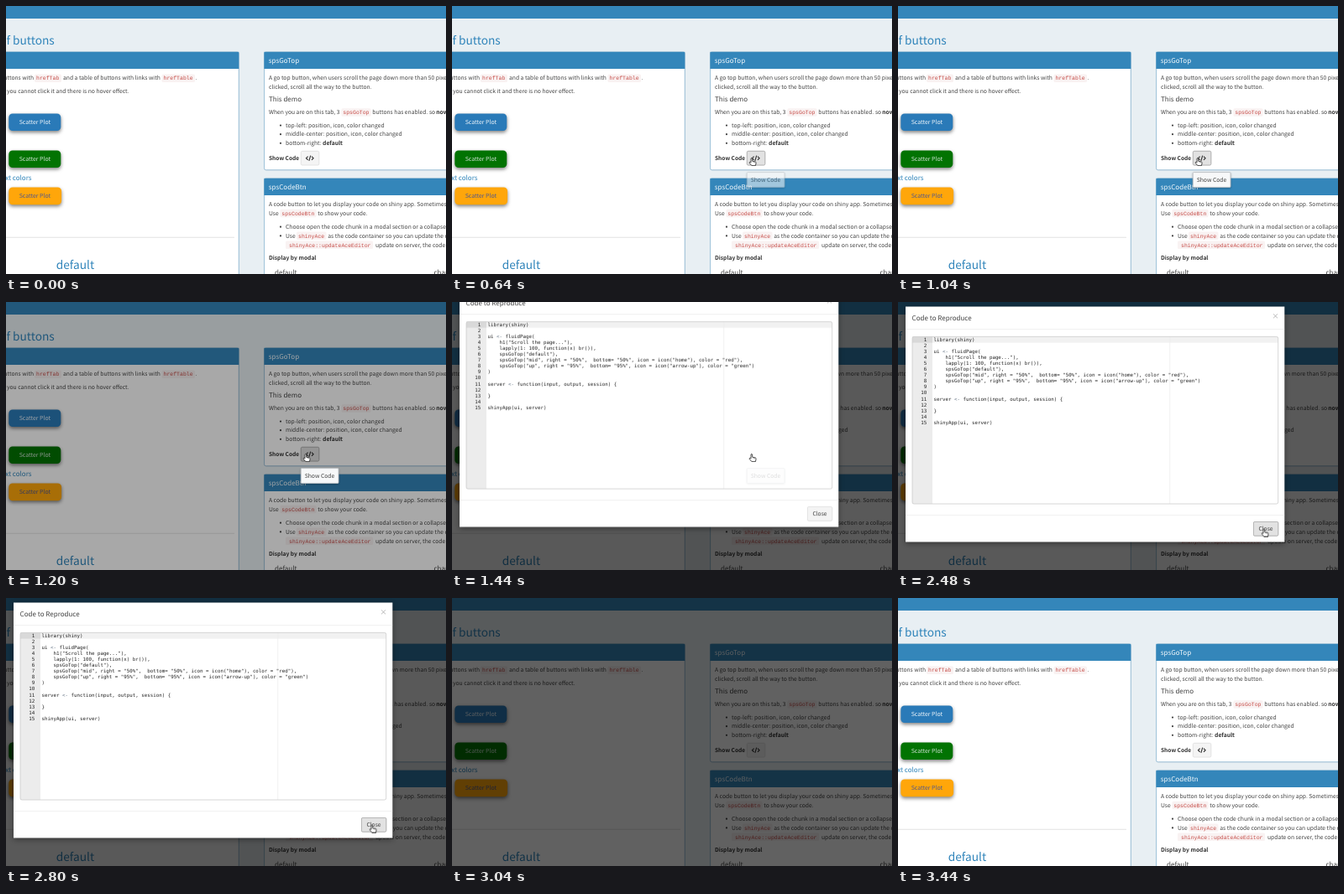
Recreate the animation shown at these times as an HTML page. Size 524 by 320 pixels, loop 3.52 s.

```html
<!DOCTYPE html>
<html lang="en">
<head>
<meta charset="utf-8">
<title>Show code button</title>
<style>
html, body { margin: 0; width: 524px; height: 320px; overflow: hidden; background: #e8eff3; }
svg { display: block; }
text {
  font-family: "Noto Sans CJK JP", "Noto Sans CJK SC", "Noto Sans CJK", "Noto Sans", sans-serif;
  font-size: 6.75px; fill: #444; white-space: pre; text-rendering: geometricPrecision;
}
.head { font-size: 8px; fill: #f4f9fc; }
.sub { font-size: 8px; }
.big { font-size: 13.7px; }
.label { font-size: 6.95px; text-anchor: middle; }
.blue { fill: #2f84ba; }
.bold { font-weight: 700; fill: #333; }
.end { text-anchor: end; }
.mid { text-anchor: middle; }
.code { font-family: "Liberation Mono", "DejaVu Sans Mono", monospace; font-size: 6.5px; fill: #c54a45; }
.chip { fill: #f9f2f2; }
.src, .src tspan { font-family: "DejaVu Sans Mono", "Noto Sans Mono", monospace; font-size: 5.8px; fill: #222; }
.src .op { fill: #687687; }
.bar { fill: #3486ba; }
.card { fill: #fff; stroke: #93bdd7; stroke-width: .9; filter: drop-shadow(0 .6px .6px rgba(0,0,0,.15)); }
.pill { filter: drop-shadow(0 2px 2.3px rgba(0,0,0,.5)); }
.btn { fill: #f4f4f4; stroke: #ddd; stroke-width: .8; }
.hot { fill: #e2e2e2; stroke: #a6a6a6; stroke-width: .8; }
.rule { stroke: #dcdcdc; stroke-width: .8; }

#dim, #modal, #tip, #hand, #hover1, #hover2 { animation: 3520ms linear infinite; }
#dim { animation-name: dim; }
#modal { animation-name: modal; }
#tip { animation-name: tip; }
#hand { animation-name: hand; }
#hover1 { animation-name: hover1; }
#hover2 { animation-name: hover2; }

/* backdrop fades in 150 ms, then the dialog fades in 150 ms and slides 300 ms */
@keyframes dim {
  0%, 31.8% { opacity: 0; }
  36.2%, 86.2% { opacity: .65; }
  90.5%, 100% { opacity: 0; }
}
@keyframes modal {
  0%, 36.2% { opacity: 0; transform: translateY(-70px); animation-timing-function: ease-out; }
  44.7%, 81.9% { opacity: 1; transform: none; animation-timing-function: ease-out; }
  90.4%, 100% { opacity: 0; transform: translateY(-70px); }
}
@keyframes fade {
  0%, 36.2% { opacity: 0; }
  40.5%, 81.9% { opacity: 1; }
  86.2%, 100% { opacity: 0; }
}
@keyframes slide {
  0%, 36.2% { transform: translateY(-70px); animation-timing-function: ease-out; }
  44.7%, 81.9% { transform: none; animation-timing-function: ease-out; }
  90.4%, 100% { transform: translateY(-70px); }
}
#modal { animation-name: fade, slide; }
@keyframes tip {
  0%, 15% { opacity: 0; }
  20.7%, 36.9% { opacity: 1; }
  41.8%, 100% { opacity: 0; }
}
@keyframes hand {
  0%, 1% { transform: translate(404px, 326px); animation-timing-function: ease-out; }
  6.8%, 51% { transform: translate(356px, 181px); animation-timing-function: ease-in-out; }
  66.5%, 82% { transform: translate(435px, 270.5px); animation-timing-function: ease-in; }
  86%, 100% { transform: translate(448px, 326px); }
}
@keyframes hover1 {
  0%, 5.5% { opacity: 0; }
  6.8%, 38% { opacity: 1; }
  40%, 100% { opacity: 0; }
}
@keyframes hover2 {
  0%, 64.5% { opacity: 0; }
  66%, 100% { opacity: 1; }
}
</style>
</head>
<body>
<svg width="524" height="320" viewBox="0 0 524 320">
  <rect width="524" height="320" fill="#e8eff3"/>
  <rect class="bar" width="524" height="15"/>
  <text class="big blue end" x="57.7" y="46.2">of buttons</text>

  <!-- left card -->
  <rect class="card" x="-10" y="55" width="287.3" height="290" rx="2"/>
  <rect class="bar" x="-10" y="54.8" width="287.3" height="20.2"/>
  <text class="end" x="33.2" y="88.3">buttons with</text>
  <rect class="chip" x="34" y="81.5" width="32" height="9.5" rx="1.5"/>
  <text class="code" x="36" y="88.3">hrefTab</text>
  <text x="68" y="88.3">and a table of buttons with links with</text>
  <rect class="chip" x="185.5" y="81.5" width="39.5" height="9.5" rx="1.5"/>
  <text class="code" x="187.5" y="88.3">hrefTable</text>
  <text x="225.5" y="88.3">.</text>
  <text x="1" y="104.2">you cannot click it and there is no hover effect.</text>
  <g class="pill">
    <rect x="3.3" y="128.5" width="62" height="20.6" rx="4.5" fill="#2a7ab8"/>
    <rect x="3.3" y="172.5" width="62" height="20.6" rx="4.5" fill="#027302"/>
    <rect x="3.3" y="216.5" width="62.8" height="20.8" rx="4.5" fill="#ffa60a"/>
  </g>
  <text class="label" x="34.4" y="141.4" style="fill:#eef5fa">Scatter Plot</text>
  <text class="label" x="34.4" y="185.4" style="fill:#d4e2d8">Scatter Plot</text>
  <text class="label" x="34.4" y="229.4" style="fill:#50588c">Scatter Plot</text>
  <text class="sub blue end" x="30.5" y="207.6">text colors</text>
  <path class="rule" d="M0 276.3H272"/>
  <text class="big blue" x="59.8" y="314.4">default</text>

  <!-- upper right card -->
  <rect class="card" x="307.6" y="55" width="230" height="140.8" rx="2"/>
  <rect class="bar" x="307.4" y="54.8" width="230" height="20.2"/>
  <text class="head" x="312.8" y="68">spsGoTop</text>
  <text x="313" y="88.3">A go top button, when users scroll the page down more than 50 pixels,</text>
  <text x="313" y="99.2">clicked, scroll all the way to the button.</text>
  <text class="sub" x="313" y="114">This demo</text>
  <text x="313" y="129.2">When you are on this tab, 3</text>
  <rect class="chip" x="399.5" y="122.2" width="35" height="9.5" rx="1.5"/>
  <text class="code" x="401.3" y="129.2">spsGoTop</text>
  <text x="436.3" y="129.2">buttons has enabled. so</text>
  <text class="bold" x="512.3" y="129.2">now</text>
  <g fill="#444">
    <circle cx="327" cy="142.6" r="1.1"/>
    <circle cx="327" cy="153.2" r="1.1"/>
    <circle cx="327" cy="163.8" r="1.1"/>
  </g>
  <text x="333" y="144.8">top-left: position, icon, color changed</text>
  <text x="333" y="155.4">middle-center: position, icon, color changed</text>
  <text x="333" y="166">bottom-right: <tspan class="bold">default</tspan></text>
  <text class="bold" x="313" y="183.6" style="font-size:6.6px">Show Code</text>
  <rect class="btn" x="351.3" y="173.3" width="21.5" height="16.7" rx="1.5"/>
  <rect class="hot" id="hover1" x="351.3" y="173.3" width="21.5" height="16.7" rx="1.5"/>
  <path d="M359.6 179.6L357.5 181.7L359.6 183.8M364 179.6L366.1 181.7L364 183.8M362.7 178.6L360.9 184.8" fill="none" stroke="#333" stroke-width="1.15"/>

  <!-- lower right card -->
  <rect class="card" x="307.6" y="206" width="230" height="140" rx="2"/>
  <rect class="bar" x="307.4" y="205.8" width="230" height="20.2"/>
  <text class="head" x="312.8" y="219">spsCodeBtn</text>
  <text x="313" y="239">A code button to let you display your code on shiny app. Sometimes</text>
  <text x="313" y="249.7">Use</text>
  <rect class="chip" x="326.5" y="242.7" width="43" height="9.5" rx="1.5"/>
  <text class="code" x="328.3" y="249.7">spsCodeBtn</text>
  <text x="371.3" y="249.7">to show your code.</text>
  <g fill="#444">
    <circle cx="327" cy="263.7" r="1.1"/>
    <circle cx="327" cy="274.4" r="1.1"/>
  </g>
  <text x="333" y="265.9">Choose open the code chunk in a modal section or a collapse</text>
  <text x="333" y="276.6">Use</text>
  <rect class="chip" x="346" y="269.6" width="35.5" height="9.5" rx="1.5"/>
  <text class="code" x="348" y="276.6">shinyAce</text>
  <text x="383.3" y="276.6">as the code container so you can update the code</text>
  <rect class="chip" x="333" y="280.6" width="104" height="9.5" rx="1.5"/>
  <text class="code" x="337" y="287.5">shinyAce::updateAceEditor</text>
  <text x="440" y="287.5">update on server, the code</text>
  <text class="bold" x="313" y="303" style="font-size:6.7px">Display by modal</text>
  <text class="sub" x="320" y="321">default</text>
  <text class="sub" x="509.5" y="321">change</text>

  <rect id="dim" width="524" height="320"/>

  <g id="modal">
    <rect x="9" y="5.5" width="451.3" height="281" fill="#fff" style="filter:drop-shadow(0 2px 3px rgba(0,0,0,.4))"/>
    <text class="sub" x="16.6" y="22.3">Code to Reproduce</text>
    <text class="mid" x="449.5" y="20" style="font-size:8.5px;fill:#aaa">×</text>
    <path class="rule" d="M9 32.5H460.3M9 254.5H460.3" opacity=".5"/>
    <rect x="17" y="41.4" width="435.7" height="199.6" rx="2" fill="#fff"/>
    <rect x="17" y="41.4" width="24" height="199.6" fill="#ececec"/>
    <rect x="17" y="41.6" width="24" height="7" fill="#d9d9d9"/>
    <rect x="41" y="41.6" width="411.5" height="7" fill="#f1f1f1"/>
    <path d="M323.7 41.6V241" stroke="#ebebeb" stroke-width=".7"/>
    <rect x="17" y="41.4" width="435.7" height="199.6" rx="2" fill="none" stroke="#ccc" stroke-width=".8"/>
    <g id="lines"></g>
    <rect class="btn" x="423.4" y="262.4" width="29.4" height="16.8" rx="1.5"/>
    <rect class="hot" id="hover2" x="423.4" y="262.4" width="29.4" height="16.8" rx="1.5"/>
    <text class="mid" x="438" y="273.2">Close</text>
  </g>

  <g id="tip">
    <rect x="351.2" y="198.6" width="44.8" height="17.8" rx="1" fill="#f7f8f9" stroke="#b9bec2" stroke-width=".9" style="filter:drop-shadow(0 1px 1px rgba(0,0,0,.25))"/>
    <text class="mid" x="373.5" y="210" style="font-size:6.8px">Show Code</text>
  </g>

  <g id="hand">
    <path d="M0 1Q.9 -.4 1.7 1V4.2L5.4 5Q6.2 5.3 6.1 6.2L5.5 9.6H.9L-1.9 6.2Q-1.9 5 -.7 5.4L0 6Z" fill="#fff" stroke="#222" stroke-width=".8" stroke-linejoin="round"/>
    <path d="M3 4.8V6M4.4 5V6.2" stroke="#444" stroke-width=".5"/>
  </g>
</svg>
<script>
const source = `library(shiny)

ui <- fluidPage(
    h1("Scroll the page..."),
    lapply(1: 100, function(x) br()),
    spsGoTop("default"),
    spsGoTop("mid", right = "50%",  bottom= "50%", icon = icon("home"), color = "red"),
    spsGoTop("up", right = "95%",  bottom= "95%", icon = icon("arrow-up"), color = "green")
)

server <- function(input, output, session) {

}

shinyApp(ui, server)`;

const escapeLine = s => s.replace(/</g, "&lt;").replace("&lt;-", '<tspan class="op">&lt;-</tspan>');

document.getElementById("lines").innerHTML = source.split("\n").map((line, i) => {
  const y = 47.2 + i * 7.03;
  return `<text class="src end" x="34.3" y="${y}">${i + 1}</text>
    <text class="src" x="42.6" y="${y}">${escapeLine(line)}</text>`;
}).join("");
</script>
</body>
</html>
```
